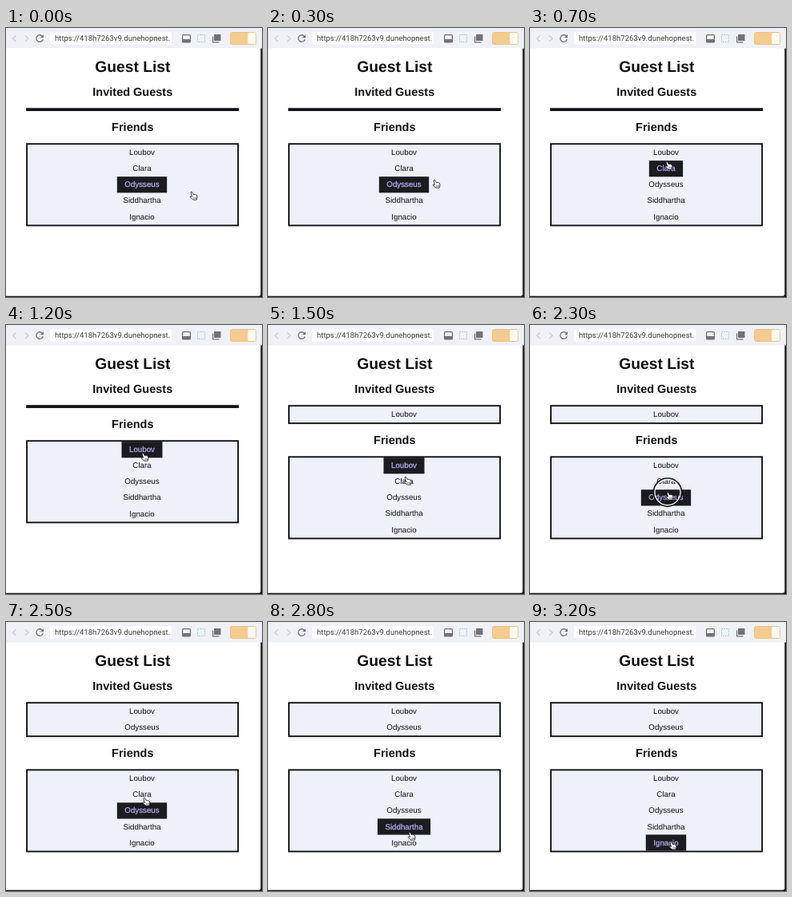
These frames come from a looping animation (320x337 px, 3300 ms). An HTML page:

```html
<!DOCTYPE html>
<html lang="en">
<head>
<meta charset="utf-8">
<title>Guest List</title>
<style>
  html, body { margin: 0; width: 100%; height: 100%; overflow: hidden; background: #fff; }
  svg { display: block; width: 320px; height: 337px; }
  text { font-family: "Liberation Sans", Arial, sans-serif; fill: #101014; text-anchor: middle; text-rendering: geometricPrecision; }
  .heading { font-weight: bold; font-size: 14.5px; }
  .name { font-size: 9.75px; }
  .name.hovered { fill: #b3aef2; stroke: #b3aef2; stroke-width: .25px; }
  .address { font: 9.55px Roboto, sans-serif; fill: #3a3c40; text-anchor: start; }
  .box { fill: #eef0fa; stroke: #111116; stroke-width: 1.9; }
  .icon { fill: none; stroke: #707276; stroke-width: 1.3; }
</style>
</head>
<body>
<svg id="stage" viewBox="0 0 320 337">
  <rect width="320" height="337" fill="#17171b"/>
  <path d="M0 0H318.300V333.500Q318.300 335.700 316 335.700H0Z" fill="#fff"/>

  <g id="toolbar">
    <rect width="320" height="25.500" fill="#f0f1f7"/>
    <path class="icon" d="M12.500 9.500L8.500 13.300L12.500 17M24 9.500L28 13.300L24 17" style="stroke:#cfd0d3"/>
    <path class="icon" d="M45.500 10.300A4.300 4.300 0 1 0 46.300 14.300"/>
    <path d="M47 8.300V12.300H43Z" fill="#707276"/>
    <rect x="55" y="5" width="152" height="15.500" rx="1" fill="#fff"/>
    <text class="address" x="61" y="16.300">https://418h7263v9.dunehopnest.</text>
    <rect class="icon" x="220.600" y="8.600" width="9.800" height="9.300" rx="1"/>
    <rect x="220.600" y="14" width="9.800" height="4" fill="#707276"/>
    <rect class="icon" x="239.500" y="8.500" width="9" height="9" style="stroke:#8ccfd0;stroke-width:1;stroke-dasharray:1.500 1.500"/>
    <rect x="260" y="8" width="8.500" height="8" rx=".5" fill="#707276"/>
    <path class="icon" d="M258.600 10.500V17.800H266.500" style="stroke-width:1.200"/>
    <rect x="280.500" y="5.500" width="32" height="15" rx="2" fill="#f4cb91" stroke="#e9c48d"/>
    <rect x="302.300" y="6" width="9.900" height="14" rx="1.500" fill="#fffaf2"/>
  </g>

  <text class="heading" x="158.300" y="55" style="font-size:19.300px">Guest List</text>
  <text class="heading" x="158.300" y="85">Invited Guests</text>
  <rect id="invitedBox" class="box" x="26.100" y="101.200" width="264"/>
  <g id="invited"></g>
  <g id="friends">
    <text class="heading" x="158.300" y="129">Friends</text>
    <rect class="box" x="26.100" y="145.200" width="264" height="102.200"/>
    <rect id="highlight" height="20.200" fill="#1b1b20"/>
  </g>

  <g id="ring" fill="none">
    <circle r="16.200" stroke="#fff" stroke-width="1.600"/>
    <circle r="17.600" stroke="#17171b" stroke-width="1.600"/>
  </g>
  <g id="cursor">
    <path transform="scale(.92)" d="M.1 1Q.9-.6 2 .8L3.700 4Q4.500 3 5.300 4Q6.200 3.200 6.900 4.400Q8 4 8.300 5.300L8.700 8L7.900 11H3.300L-.8 7.700Q-1.200 6.200 .4 6.500L1.700 7Z"
      fill="#fff" stroke="#18181c" stroke-width=".9" stroke-linejoin="round"/>
    <path d="M3.800 7V9M5.200 7V9M6.500 7V9" stroke="#18181c" stroke-width=".5"/>
  </g>
</svg>

<script>
const LOOP = 3300, STEP = 100, ROW = 20.05, CENTER = 170, PADDING = 9.5;
const names = ["Loubov", "Clara", "Odysseus", "Siddhartha", "Ignacio"];
const byId = id => document.getElementById(id);

// [time, x, y] of the pointer tip
const path = [
  [0, 231, 205], [700, 170, 167], [1200, 170, 160], [1300, 170, 160],
  [1400, 170, 172], [1500, 171, 190], [1900, 171, 206], [2300, 171, 209],
  [2400, 171, 212], [2800, 176, 263], [3000, 175, 274], [3200, 175, 275]
];
// [time, index of the hovered name]
const hovers = [[0, 2], [600, 1], [800, 0], [1600, 1], [1900, 2], [2600, 3], [2900, 4]];
// [time, index of the invited name]
const invites = [[1400, 0], [2400, 2]];
const clicks = [1300, 2300, 3100];

function addName(parent, label, y) {
  const node = document.createElementNS("http://www.w3.org/2000/svg", "text");
  node.setAttribute("class", "name");
  node.setAttribute("x", CENTER);
  node.setAttribute("y", y);
  node.textContent = label;
  byId(parent).append(node);
  return node;
}

const friendNodes = names.map((name, i) => addName("friends", name, 159.3 + i * ROW));
const invitedNodes = invites.map(([, who], i) => addName("invited", names[who], 115.3 + i * ROW));

function pointerAt(time) {
  const next = path.findIndex(point => point[0] > time);
  if (next < 0) return path[path.length - 1].slice(1);
  const [t0, x0, y0] = path[next - 1], [t1, x1, y1] = path[next];
  const u = (time - t0) / (t1 - t0), eased = u * u * (3 - 2 * u);
  return [x0 + (x1 - x0) * eased, y0 + (y1 - y0) * eased];
}

function place(id, x, y) {
  byId(id).setAttribute("transform", `translate(${x} ${y})`);
}

function render(time) {
  const count = invites.filter(([start]) => time >= start).length;
  byId("invitedBox").setAttribute("height", 1.9 + count * ROW);
  invitedNodes.forEach((node, i) => node.style.display = i < count ? "" : "none");
  place("friends", 0, count * ROW);

  const hovered = hovers.filter(([start]) => time >= start).pop()[1];
  friendNodes.forEach((node, i) => node.classList.toggle("hovered", i === hovered));
  const width = friendNodes[hovered].getComputedTextLength() + 2 * PADDING;
  const highlight = byId("highlight");
  highlight.setAttribute("x", CENTER - width / 2);
  highlight.setAttribute("y", 146.1 + hovered * ROW);
  highlight.setAttribute("width", width);

  const [x, y] = pointerAt(time);
  place("cursor", x, y);
  place("ring", x + 1, y + .6);
  byId("ring").style.display = clicks.includes(time) ? "" : "none";
}

const started = performance.now();
function tick() {
  const elapsed = (performance.now() - started) % LOOP;
  render(Math.floor(elapsed / STEP) * STEP);
  requestAnimationFrame(tick);
}
tick();
</script>
</body>
</html>
```
